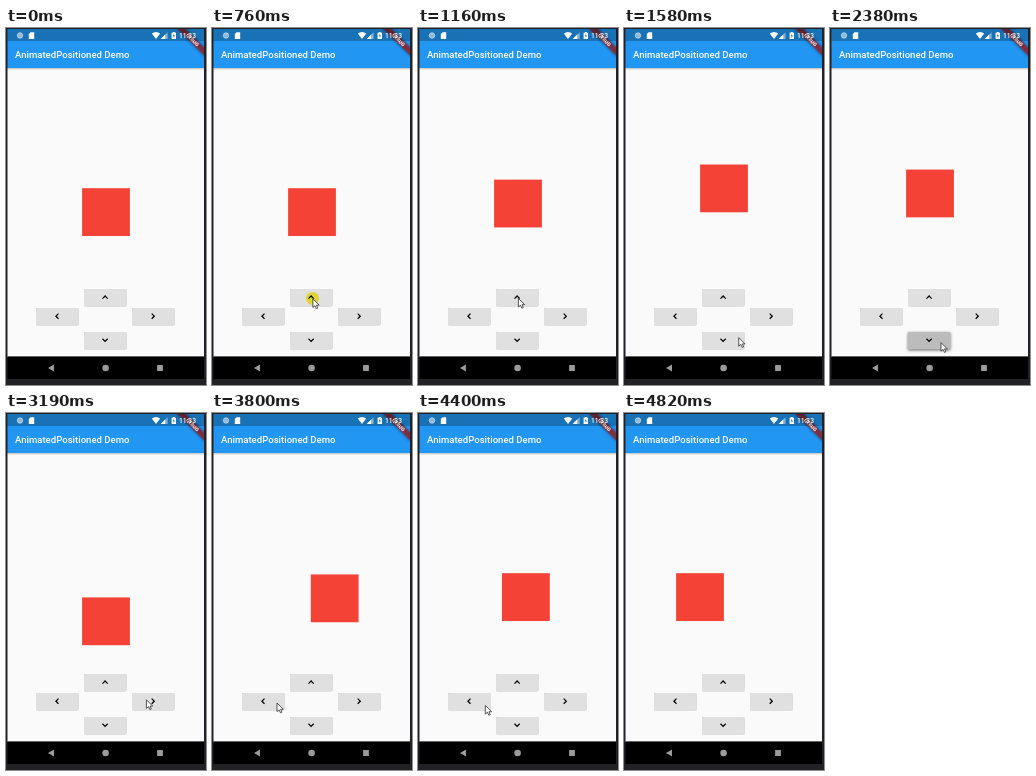
These frames come from a looping animation (200 by 357 pixels, 5410 ms). An HTML page:

```html
<!DOCTYPE html>
<html lang="en">
<head>
<meta charset="utf-8">
<title>AnimatedPositioned Demo</title>
<style>
  html, body { margin: 0; width: 100%; height: 100%; overflow: hidden; background: #222226; }
  svg { display: block; width: 100vw; height: 100vh; }
  text { font-family: Roboto, "Noto Sans", sans-serif; font-weight: 500; fill: #fff; }
  .key { fill: #e0e0e0; filter: drop-shadow(0 .9px .7px rgba(0, 0, 0, .42)); }
  .key.down { fill: #bcbcbc; filter: drop-shadow(0 1.4px 1.8px rgba(0, 0, 0, .6)); }
  .chevron { fill: none; stroke: #000; stroke-width: 1.25; }
  .shade { filter: blur(1.5px); }
  #halo { mix-blend-mode: multiply; }
</style>
</head>
<body>
<svg viewBox="0 0 200 357">
  <defs>
    <clipPath id="screen"><rect x="1.5" y="1" width="196.5" height="350"/></clipPath>
  </defs>
  <rect width="200" height="357" fill="#222226"/>
  <g clip-path="url(#screen)">
    <rect y="40" width="200" height="289" fill="#fafafa"/>
    <rect y="40" width="200" height="1" fill="#000" opacity=".18"/>
    <rect y="41" width="200" height="1" fill="#000" opacity=".07"/>
    <rect width="200" height="40" fill="#2196f3"/>
    <text x="9" y="30.3" font-size="9.57">AnimatedPositioned Demo</text>

    <g transform="translate(198 .3) rotate(45)">
      <rect class="shade" x="-20" y="13.4" width="40" height="5.8" fill-opacity=".5"/>
      <rect x="-20" y="13.4" width="40" height="5.8" fill="#b71c1c" fill-opacity=".63"/>
      <text y="18.05" font-size="4.9" text-anchor="middle" style="font-weight:900">DEBUG</text>
    </g>

    <rect width="200" height="13" fill="#000" opacity=".25"/>
    <g fill="#fff">
      <circle cx="14" cy="7.5" r="2.7" fill="#8fb9dc" stroke="#c4dbed" stroke-width=".8"/>
      <path d="M24.6 4.2H28.2V11H22.8V6Z"/>
      <path d="M145.8 5.6Q150 2.6 154.2 5.6L150 11Z"/>
      <path d="M161.6 4.2V11H154.8Z" fill-opacity=".45"/>
      <path d="M159.2 6.6V11H154.8Z"/>
      <path d="M166.8 4.8V4H168.8V4.8H170V11H165.6V4.8Z"/>
      <path d="M168 5.8L166.8 8.2H167.7V10L168.9 7.5H168Z" fill="#1971b6"/>
      <text x="173" y="10" font-size="6.7">11:33</text>
    </g>

    <rect id="box" width="47.8" height="47.8" fill="#f44336"/>
    <g id="keys"></g>

    <rect y="328.4" width="200" height="23" fill="#000"/>
    <g fill="#9b9b9b">
      <path d="M42 340L48 336.6V343.4Z"/>
      <circle cx="99.6" cy="340" r="3.3"/>
      <rect x="151.1" y="337.1" width="5.8" height="5.8" rx=".5"/>
    </g>
  </g>
  <circle id="halo" r="6.5" fill="#fff33c"/>
  <path id="pointer" d="M.4 .4V9L2.5 7.2L3.9 10.2L5.3 9.6L4 6.7H6.7Z" fill="#fff" stroke="#222" stroke-width=".75"/>
</svg>
<script>
const LOOP = 5410, FIRST = 340, TICK = 203.6, GLIDE = 650;
const home = [76.1, 160.2];

// Each press: click time, start of the glide, and where the box goes
const presses = [
  { click: 760, go: 890, to: [76.1, 136.5] },
  { click: 2170, go: 2245, to: [76.1, 184.4], dark: true },
  { click: 3400, go: 3240, to: [100, 160.2] },
  { click: 4000, go: 4160, to: [52.1, 160.2] }
];

// Pointer stops: arrival, departure, place
const stops = [
  { at: 340, leave: 340, pos: [115, 285] },
  { at: 760, leave: 1160, pos: [100, 270] },
  { at: 1580, leave: 1580, pos: [115, 311] },
  { at: 1770, leave: 1770, pos: [131, 301] },
  { at: 1970, leave: 2590, pos: [110.6, 314.2] },
  { at: 3190, leave: 3400, pos: [140, 286.4] },
  { at: 3800, leave: 4400, pos: [64.6, 289.6] },
  { at: 4620, leave: 4800, pos: [107, 334.5] }
];

const el = id => document.getElementById(id);
const clamp = u => Math.min(1, Math.max(0, u));
const ease = u => u * u * (3 - 2 * u);
const mix = (a, b, u) => a.map((v, i) => v + (b[i] - v) * u);
const place = (node, [x, y]) => node.setAttribute("transform", `translate(${x} ${y})`);
const show = (node, on) => node.setAttribute("visibility", on ? "visible" : "hidden");

// Keys: left, top, chevron angle
const keys = [[78, 261, 0], [30, 280, -90], [126, 280, 90], [78, 304, 180]];
el("keys").innerHTML = keys.map(([x, y, angle]) => `
  <g transform="translate(${x} ${y})">
    <rect class="key" width="42.3" height="17.3" rx="1"/>
    <path class="chevron" d="M-2.6 1.4L0 -1.2L2.6 1.4" transform="translate(21.1 8.2) rotate(${angle})"/>
  </g>`).join("");

const box = el("box"), pointer = el("pointer"), halo = el("halo");
const downKey = el("keys").lastElementChild.querySelector(".key");

function hold(t) {
  const n = Math.floor((t - FIRST + 15) / TICK);
  return n < 0 ? 0 : FIRST + n * TICK;
}

function boxAt(t) {
  return presses.reduce((pos, p) => mix(pos, p.to, ease(clamp((t - p.go) / GLIDE))), home);
}

function pointerAt(t) {
  return stops.reduce((pos, stop, i) => {
    const from = i ? stops[i - 1].leave : 0;
    return mix(pos, stop.pos, clamp((t - from) / (stop.at - from)));
  }, stops[0].pos);
}

function draw(time) {
  const t = hold(time);
  const since = p => Math.round((t - p.click) / TICK);
  const tip = pointerAt(t);
  place(box, boxAt(t));
  place(pointer, tip);
  place(halo, tip);
  show(pointer, t >= FIRST && t < stops.at(-1).leave);
  show(halo, presses.some(p => since(p) === 0));
  downKey.classList.toggle("down", presses.some(p => p.dark && since(p) === 1));
}

const start = performance.now();
function tick() {
  draw((performance.now() - start) % LOOP);
  requestAnimationFrame(tick);
}
tick();
</script>
</body>
</html>
```
